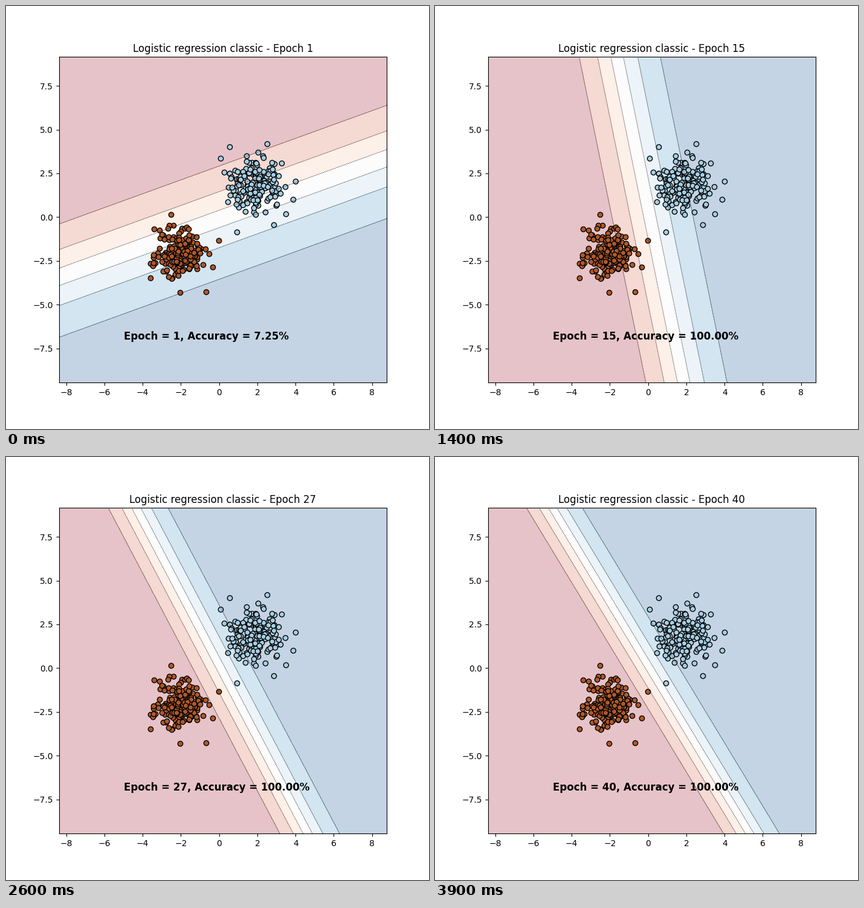
Recreate the animation shown at these times as a matplotlib script. Size 700x700 px, loop 4000 ms.

```python
import math
import numpy as np
import matplotlib.pyplot as plt
from matplotlib.animation import FuncAnimation

EPOCHS = 40
POINTS = 200  # per class
X_LIM = (-8.383, 8.767)
Y_LIM = (-9.446, 9.161)

# Probability bands, 0.15 apart, expressed as logits
PROBS = np.arange(0.15, 1, 0.15)
LOGITS = np.log(PROBS / (1 - PROBS))
BANDS = np.concatenate([[-60], LOGITS, [60]])
BAND_COLORS = plt.get_cmap("RdBu")((np.arange(7) + 0.5) / 7)


def cluster(rng, center, spread, reach, outliers):
    """Gaussian cloud cut off at `reach` sigmas, plus a few outliers."""
    cloud = rng.normal(size=(2 * POINTS, 2))
    cloud = cloud[np.hypot(*cloud.T) < reach][:POINTS - len(outliers)]
    return np.vstack([outliers, cloud * spread + center])


def settle(start, end, rate, t):
    """Move from start towards end, quickly at first, then levelling off."""
    return end + (start - end) * math.exp(-rate * t ** 1.5)


def model_at(frame):
    t = frame / (EPOCHS - 1)
    return (settle(0.2404, 1.360, 4.4, t),
            settle(-0.6077, 0.775, 3.87, t),
            settle(0.038, 0, 4.4, t))


def accuracy_of(w1, w2):
    """Percentage of points expected on the right side of the boundary."""
    margin = 2.58 * (w1 + w2) / math.hypot(w1, w2)
    share = (1 + math.erf(margin / math.sqrt(2))) / 2
    total = 2 * POINTS
    return 100 * int(share * total + 0.55) / total


rng = np.random.default_rng(7)
blue = cluster(rng, (1.92, 1.9), (0.78, 0.8), 2.3, [
    (0.55, 4.02), (2.51, 4.20), (0.08, 3.35), (0.93, -0.85),
    (2.87, -0.43), (3.49, 0.17), (3.98, 2.05), (3.87, 1.02)])
brown = cluster(rng, (-2.08, -1.95), (0.77, 0.73), 2.2, [
    (-2.53, 0.15), (-2.04, -4.31), (-0.67, -4.28), (-0.02, -1.35),
    (-3.58, -3.49), (-3.40, -0.67), (-0.35, -2.86)])
xx, yy = np.meshgrid(np.linspace(*X_LIM, 5), np.linspace(*Y_LIM, 5))

fig, ax = plt.subplots(figsize=(7, 7), dpi=100)


def draw(frame):
    epoch = frame + 1
    w1, w2, bias = model_at(frame)
    logit = w1 * xx + w2 * yy + bias

    ax.clear()
    ax.contourf(xx, yy, logit, levels=BANDS, colors=BAND_COLORS, alpha=0.25)
    ax.contour(xx, yy, logit, levels=LOGITS, colors="k",
               linestyles=":", linewidths=0.7)
    for points, color in ((blue, "#a6cee3"), (brown, "#b15928")):
        ax.scatter(*points.T, c=color, edgecolors="k")
    ax.set_xlim(X_LIM)
    ax.set_ylim(Y_LIM)
    ax.set_title(f"Logistic regression classic - Epoch {epoch}")
    ax.text(-5, -7, f"Epoch = {epoch}, Accuracy = {accuracy_of(w1, w2):.2f}%",
            fontsize=12, fontweight="bold")
    return []


anim = FuncAnimation(fig, draw, frames=EPOCHS, interval=100,
                     repeat=True, repeat_delay=0)
plt.show()
```
